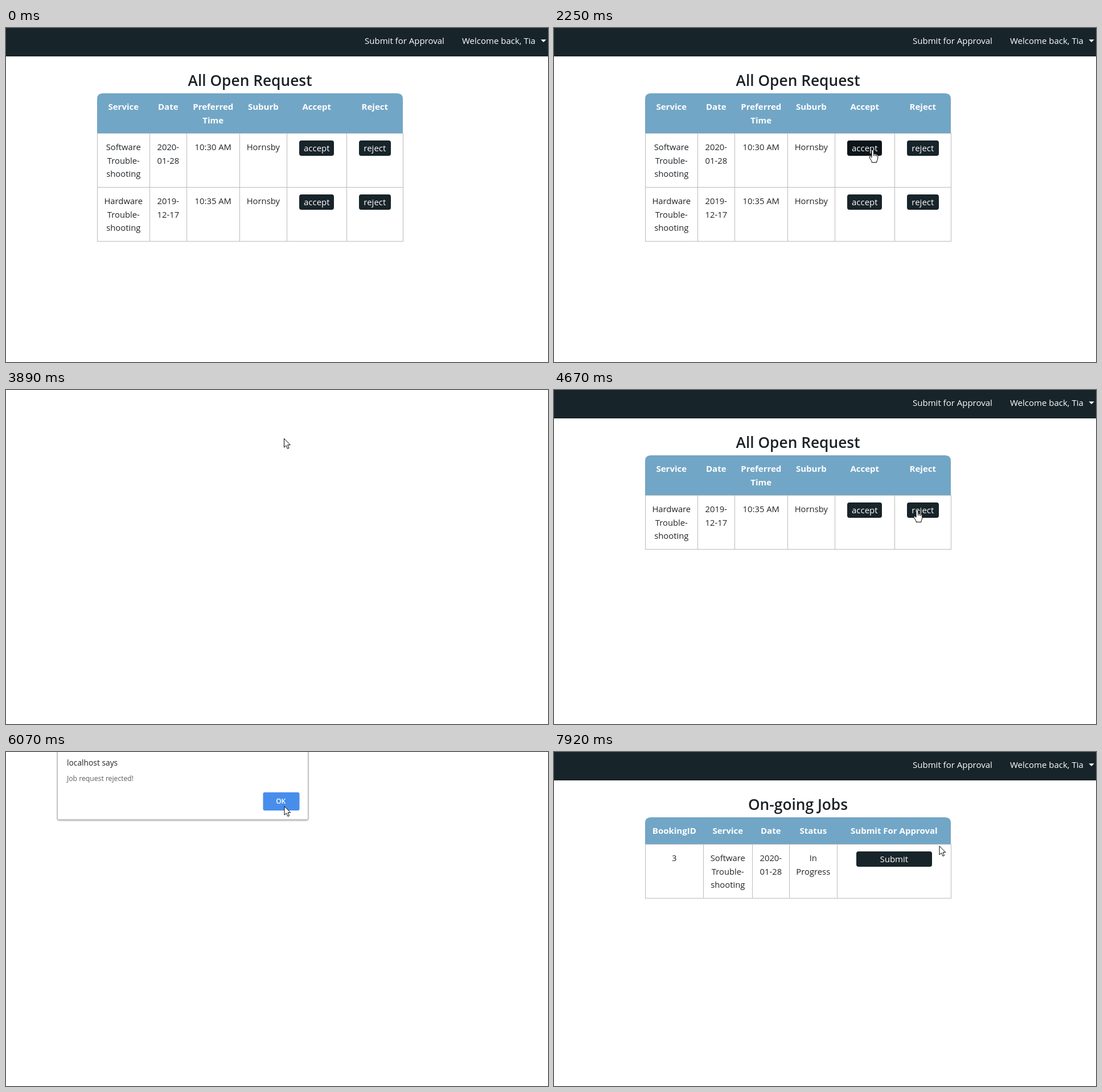
An HTML page for the animation above (8000 ms loop, 952x588 px).

```html
<!DOCTYPE html>
<html lang="en">
<head>
<meta charset="utf-8">
<title>Job requests</title>
<style>
html, body { margin: 0; width: 100%; height: 100%; overflow: hidden; background: #fff; }
svg { display: block; width: 952px; height: 588px; font-family: "Open Sans", "Noto Sans", sans-serif; }
.mid { text-anchor: middle; }
.nav, .btn { font-size: 15px; fill: #fff; }
.title { font-size: 26.3px; font-weight: 600; fill: #1b2227; }
.note { font-size: 22.1px; font-weight: 600; fill: #1b2227; }
.head { font-size: 15px; font-weight: 700; fill: #fff; }
.cell { font-size: 14.8px; fill: #212529; }
.site { font-size: 13.8px; fill: #212529; }
.message { font-size: 12.2px; fill: #5a5d61; }
.ok { font-size: 12px; font-weight: 600; fill: #fff; }
.line { fill: none; stroke: #bbb; }
.box { fill: #fff; stroke: #b2b4b6; filter: drop-shadow(0 1px 1.5px rgba(0,0,0,.4)); }
.pointer { fill: #fff; stroke: #000; stroke-linejoin: round; }
</style>
</head>
<body>
<svg id="stage" viewBox="0 0 952 588"></svg>
<script>
const LOOP = 8000, STEP = 77.7, FADE = 240;
const DARK = '#17242a', PRESSED = '#0d151a', BLUE = '#72a6c6';
const LEFT = 160, TOP = 115, ROW = 95, LEADING = 23.5;
const stage = document.getElementById('stage');

function add(parent, tag, attrs = {}, text) {
  const el = document.createElementNS('http://www.w3.org/2000/svg', tag);
  for (const key in attrs) el.setAttribute(key, attrs[key]);
  if (text) el.textContent = text;
  parent.appendChild(el);
  return el;
}
const group = parent => add(parent, 'g');
const label = (parent, cls, x, y, text) => add(parent, 'text', { class: cls, x, y }, text);
const lines = (parent, cls, x, y, text) =>
  text.split('|').forEach((s, i) => label(parent, cls + ' mid', x, y + Math.round(i * LEADING), s));

function button(parent, mid, y, width, text) {
  const rect = add(parent, 'rect', { x: Math.round(mid - width / 2), y, width, height: 27, rx: 4, fill: DARK });
  label(parent, 'btn mid', mid, y + 19, text);
  return rect;
}

// Columns are [heading, width]; returns the page with the centre of each column.
function tablePage(title, columns, headHeight, rows) {
  const page = group(stage), bottom = TOP + headHeight;
  const width = columns.reduce((sum, c) => sum + c[1], 0);
  label(page, 'title mid', 428.5, 102, title);
  add(page, 'path', { fill: BLUE, d: `M${LEFT} ${bottom}v${10 - headHeight}q0-10 10-10h${width - 20}q10 0 10 10v${headHeight - 10}z` });
  rows.forEach((_, r) => add(page, 'rect', { class: 'line', x: LEFT + .5, y: bottom + r * ROW + .5, width, height: ROW }));
  let x = LEFT;
  const mids = columns.map(([heading, w], i) => {
    const mid = x + w / 2 + .3;
    lines(page, 'head', mid, TOP + 29, heading);
    rows.forEach((row, r) => row[i] && lines(page, 'cell', mid, bottom + r * ROW + 30, row[i]));
    if (i) add(page, 'path', { class: 'line', d: `M${x + .5} ${bottom}v${rows.length * ROW}` });
    x += w;
    return mid;
  });
  return { page, mids, bottom };
}

function requestPage(rows) {
  const { page, mids, bottom } = tablePage('All Open Request',
    [['Service', 92], ['Date', 65], ['Preferred|Time', 93], ['Suburb', 83], ['Accept', 105], ['Reject', 99]], 70, rows);
  const buttons = rows.map((_, r) => {
    const y = bottom + r * ROW + 13;
    return { accept: button(page, mids[4], y, 61, 'accept'), reject: button(page, mids[5], y, 56, 'reject') };
  });
  return { page, buttons };
}

const nav = group(stage);
add(nav, 'rect', { width: 952, height: 50, fill: DARK });
const link = label(nav, 'nav', 630, 28, 'Submit for Approval');
label(nav, 'nav', 801, 28, 'Welcome back, Tia');
add(nav, 'path', { d: 'M939.3 20.2h9.6l-4.8 4.800z', fill: '#fff' });

const software = ['Software|Trouble-|shooting', '2020-|01-28', '10:30 AM', 'Hornsby'];
const hardware = ['Hardware|Trouble-|shooting', '2019-|12-17', '10:35 AM', 'Hornsby'];
const both = requestPage([software, hardware]);
const single = requestPage([hardware]);

const empty = group(stage);
label(empty, 'note mid', 428.5, 98, 'You have no open job assignment request at the moment');

const jobs = tablePage('On-going Jobs',
  [['BookingID', 102], ['Service', 86], ['Date', 65], ['Status', 84], ['Submit For Approval', 200]], 47,
  [['3', software[0], software[1], 'In|Progress']]);
button(jobs.page, jobs.mids[4], jobs.bottom + 13, 133, 'Submit');

const dialog = group(stage);
add(dialog, 'rect', { class: 'box', x: 90.5, y: -10, width: 440, height: 129, rx: 2 });
label(dialog, 'site', 107, 24, 'localhost says');
const message = label(dialog, 'message', 107, 51);
add(dialog, 'rect', { x: 451.5, y: 71, width: 64, height: 32, rx: 3, fill: '#478eec' });
label(dialog, 'ok mid', 482.7, 91.3, 'OK');

const cursor = add(stage, 'g', { class: 'pointer' });
const arrow = add(cursor, 'path', { d: 'M.5 .5V16L4 12.7L6.5 18.3L9 17.2L6.6 11.7H11.3Z' });
const hand = group(cursor);
add(hand, 'path', { d: 'M-2 1.5Q-.2 -.7 1.500 1.500V7.500Q3 6.3 4 8Q5.600 7 6.400 8.800Q8.600 8 8.800 10.500V15Q8.600 18 7 20V22.500H-2V20.500Q-4 17 -6 14Q-6.600 11.400 -4.200 12L-2 14.200Z' });
add(hand, 'path', { d: 'M1.500 7.500V11M4 8V11.500M6.400 8.800V12', fill: 'none' });

// Each move curves from the last resting point, past a bend, to a new one.
const START = [113, -29];
const moves = [
  { from: 1010, to: 1620, bend: [336, 92], end: [560, 214] },
  { from: 2940, to: 3490, bend: [553, 33], end: [488, 85] },
  { from: 4190, to: 4670, bend: [580, 130], end: [638, 210] },
  { from: 5610, to: 6070, bend: [560, 130], end: [488.5, 95] },
  { from: 6600, to: 7230, bend: [612, 85], end: [679, 28] },
  { from: 7690, to: 7920, bend: [692, 60], end: [676.5, 165] }
];
const dialogs = [
  { open: 2490, close: 3640, text: 'Job request accepted!' },
  { open: 5210, close: 6130, text: 'Job request rejected!' }
];
const scenes = [
  [0, [nav, both.page]], [2490, []], [3960, [nav, single.page]],
  [5210, []], [6460, [nav, empty]], [7380, [nav, jobs.page]]
];
const parts = [nav, both.page, single.page, empty, jobs.page];

const within = (t, a, b) => t >= a && t < b;
const ramp = (t, a, b) => Math.min(1, Math.max(0, (t - a) / (b - a)));
const show = (el, on) => { el.style.display = on ? '' : 'none'; };

function cursorAt(t) {
  const i = moves.filter(m => t >= m.from).length - 1;
  const { from, to, bend, end } = moves[i];
  const start = i ? moves[i - 1].end : START;
  const count = Math.round((to - from) / STEP) + 1;
  const step = Math.min(count, Math.floor((t - from + 12) / STEP) + 1);
  const e = 1 - (1 - step / count) ** 2;
  return start.map((s, k) => s * (1 - e) ** 2 + 2 * bend[k] * e * (1 - e) + end[k] * e * e);
}

function draw(t) {
  const visible = scenes.filter(s => t >= s[0]).pop()[1];
  parts.forEach(p => show(p, visible.includes(p)));

  const box = dialogs.find(d => within(t, d.open, d.close + FADE));
  show(dialog, box);
  if (box) {
    message.textContent = box.text;
    dialog.setAttribute('opacity', Math.min(
      ramp(t, box.open - STEP, box.open + FADE), 1 - ramp(t, box.close - STEP / 2, box.close + FADE)));
  }

  both.buttons[0].accept.setAttribute('fill', t >= 2170 ? PRESSED : DARK);
  single.buttons[0].reject.setAttribute('fill', t >= 4750 ? PRESSED : DARK);
  link.style.fill = within(t, 6990, 7380) || within(t, 7690, 7765) ? BLUE : '#fff';

  show(cursor, t >= moves[0].from);
  if (t < moves[0].from) return;
  const pointing = within(t, 1470, 2940) || within(t, 4660, 5610) || within(t, 6990, 7765);
  show(hand, pointing);
  show(arrow, !pointing);
  cursor.setAttribute('transform', `translate(${cursorAt(t)})`);
}

const begin = performance.now();
function tick() {
  draw((performance.now() - begin) % LOOP);
  requestAnimationFrame(tick);
}
tick();
</script>
</body>
</html>
```
